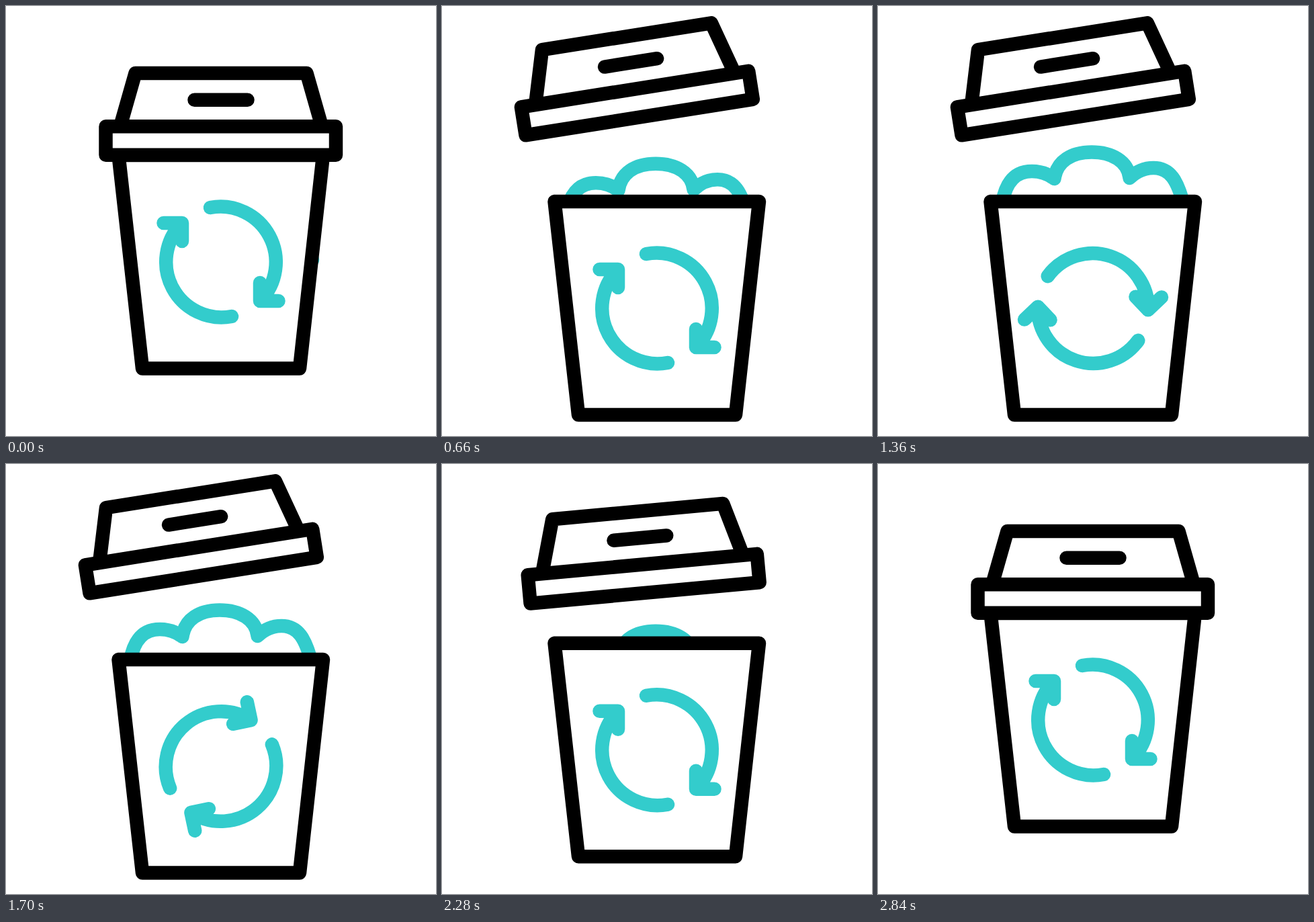
An HTML page that plays this animation: 640 by 640 pixels, repeating every 3600 ms.

```html
<!DOCTYPE html>
<html lang="en">
<head>
<meta charset="utf-8">
<title>Recycling cup</title>
<style>
  html, body { margin: 0; width: 100%; height: 100%; overflow: hidden; background: #fff; }
  svg { display: block; width: 100%; height: 100%; }
  .ink, .teal { stroke-width: 20.5; stroke-linecap: round; stroke-linejoin: round; }
  .ink { stroke: #000; fill: #fff; }
  .teal { stroke: #3cc; fill: none; }
</style>
</head>
<body>
<svg viewBox="0 0 640 640">
  <defs>
    <path id="arrow" d="M304 300A82.5 82.5 0 0 1 378 439M405.5 439H378V412"/>
  </defs>
  <g id="trash" class="teal">
    <path d="M185 292C191 260 206 246 229 246Q248 246 262.5 257
             C266 231 288 217.5 318 217.5S372 231 374.5 256
             Q390 241 410 241C434 241 446 258 456 300"/>
  </g>
  <g id="cup">
    <path class="ink" d="M167.5 222H472L437 539.5H203Z"/>
    <g id="arrows" class="teal">
      <use href="#arrow"/>
      <use href="#arrow" transform="rotate(180 320 381)"/>
    </g>
  </g>
  <g id="lid" class="ink">
    <path d="M170 179L192.5 100H447.5L470 179"/>
    <path d="M280.5 139.7H359.5"/>
    <rect x="148.5" y="179.3" width="342.5" height="42.5"/>
  </g>
</svg>
<script>
const LOOP = 3600, STEP = 20;

const place = (id, transform) =>
  document.getElementById(id).setAttribute("transform", transform);

function draw(t) {
  // Smooth progress from 0 to 1 between two times.
  const ease = (from, to) => {
    const u = Math.min(1, Math.max(0, (t - from) / (to - from)));
    return u * u * (3 - 2 * u);
  };

  const shut = ease(2120, 2520);
  const open = ease(0, 500) - shut;
  const tilt = ease(240, 640) - ease(2120, 2480);
  const rebound = ease(2760, 2840);
  const press = shut - rebound;
  const squash = 0.234 * (ease(2480, 2760) - rebound);
  const sunk = 78 * (1 - ease(340, 800)) + 60 * ease(2100, 2450);

  place("cup", `translate(0 ${69 * open})`);
  place("arrows", `rotate(${360 * ease(740, 2220)} 320 381)`);
  place("trash", `translate(0 ${sunk})`);
  place("lid", `translate(${314 - 38 * open} ${145 - 54.4 * open + 17.5 * press}) ` +
    `rotate(${-9 * tilt}) scale(${1 + squash} ${1 - squash}) translate(-314 -145)`);
}

const start = performance.now();
function tick() {
  const t = (performance.now() - start) % LOOP;
  draw(Math.floor(t / STEP) * STEP);
  requestAnimationFrame(tick);
}
draw(0);
requestAnimationFrame(tick);
</script>
</body>
</html>
```
